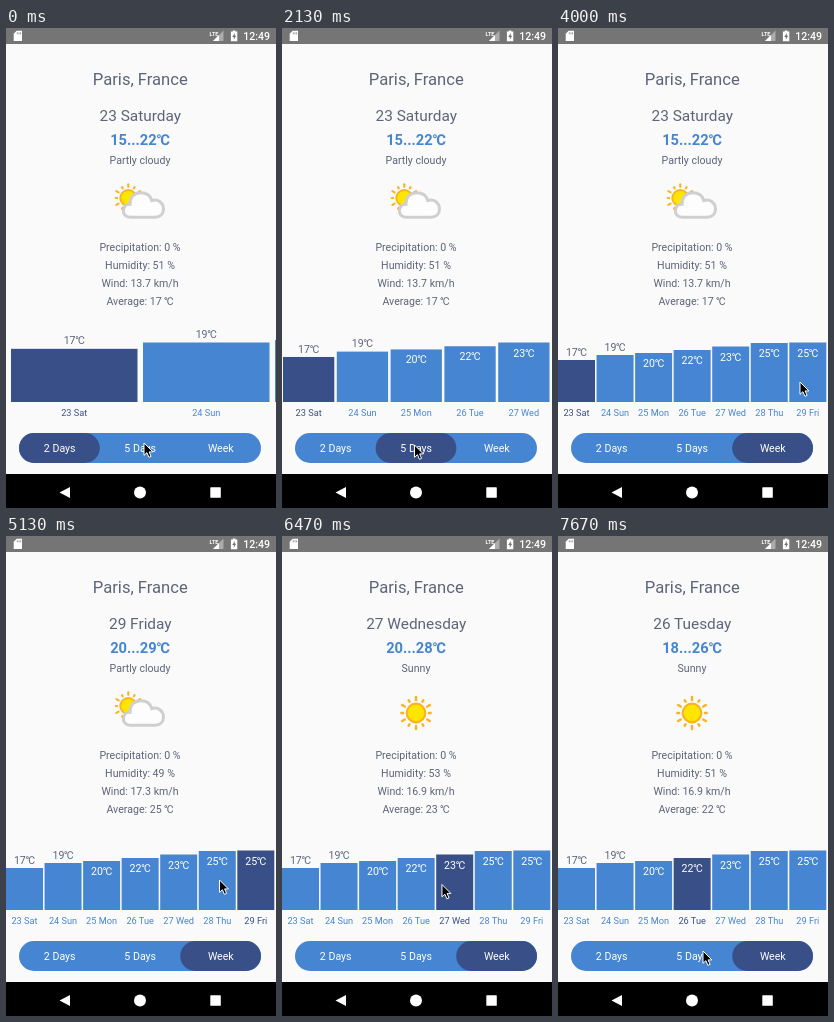
An HTML page that plays this animation: 270x480 px, repeating every 8000 ms.

```html
<!DOCTYPE html>
<html lang="en">
<head>
<meta charset="utf-8">
<title>Weather</title>
<style>
html, body { margin: 0; width: 100%; height: 100%; overflow: hidden; background: #fafafa; }
svg { display: block; width: 100vw; height: 100vh; }
text {
  font: 10.6px Roboto, 'Noto Sans CJK SC', 'Noto Sans CJK JP', sans-serif;
  text-anchor: middle;
  fill: #5d6478;
}
#city { font-size: 16.6px; }
#date { font-size: 15.4px; }
#range { font-size: 14.7px; font-weight: 700; fill: #4685d1; }
.bar { fill: #4685d1; }
.bar.on { fill: #394f88; }
.day { font-size: 9.2px; fill: #4685d1; }
.day.on { fill: #394f88; }
.inside, .tab { fill: #fff; }
#status text { fill: #fff; }
</style>
</head>
<body>
<svg viewBox="0 0 270 480">
  <defs>
    <g id="sun">
      <g id="rays" stroke="#f8b423" stroke-width="2.5" stroke-linecap="round"></g>
      <circle r="9.3" fill="#ffe500" stroke="#f8b423" stroke-width="2.2"/>
    </g>
  </defs>
  <rect width="270" height="480" fill="#fafafa"/>

  <text id="city" x="134.3" y="57">Paris, France</text>
  <text id="date" x="134.3" y="93"></text>
  <text id="range" x="134" y="117"></text>
  <text id="sky" x="134" y="136"></text>
  <use id="sunny" href="#sun" x="134" y="177"/>
  <g id="cloudy">
    <use href="#sun" transform="translate(122.3 170) scale(.86)"/>
    <path d="M125 189.3C119 189.3 116.800 185.500 117.500 181.500C118.200 178 121 176 124 176.300C124 169 128.500 164.800 135 164.800C140.500 164.800 144.500 168 145.800 172.500C152 170.500 157.500 175 157.500 181C157.500 186 154 189.300 149 189.300Z"
      fill="#fdfdfd" stroke="#cfcfd1" stroke-width="3"/>
  </g>
  <g id="facts"></g>

  <g id="chart"></g>

  <rect x="13" y="405" width="242" height="30" rx="15" fill="#4685d1"/>
  <rect id="pill" x="13" y="405" width="80.8" height="30" rx="15" fill="#394f88"/>
  <text class="tab" x="53.7" y="424.300">2 Days</text>
  <text class="tab" x="134.2" y="424.300">5 Days</text>
  <text class="tab" x="214.8" y="424.300">Week</text>

  <g id="status">
    <rect width="270" height="16" fill="#757575"/>
    <path d="M10.700 2.800H16V13H7.700V5.800Z" fill="#fff"/>
    <path d="M11.300 4.300V6.300M13 4.300V6.300M14.600 4.300V6.300" stroke="#757575" stroke-width=".7"/>
    <path d="M217.500 2.500V13H207Z" fill="#fff" opacity=".4"/>
    <path d="M213 7V13H207Z" fill="#fff"/>
    <text x="208" y="7.600" style="font-size:5.500px;font-weight:700">LTE</text>
    <path d="M226.800 2.500H229.400V3.600H231.300V13.200H224.900V3.600H226.800Z" fill="#fff"/>
    <path d="M228.800 5L226.200 9H227.800V11.800L230.200 7.800H228.800Z" fill="#757575"/>
    <text x="250.700" y="12" style="font-weight:500">12:49</text>
  </g>

  <rect y="446" width="270" height="34" fill="#000"/>
  <g fill="#fff">
    <path d="M53.500 464.500L64 459V470Z"/>
    <circle cx="134" cy="464.500" r="6"/>
    <rect x="204.300" y="459.300" width="10.500" height="10.500" rx=".6"/>
  </g>

  <path id="cursor" d="M0 0V12.300L2.900 9.700L4.900 14.300L7.100 13.400L5.100 8.900H8.900Z"
    fill="#000" stroke="#fff" stroke-width="1" stroke-linejoin="round"/>
</svg>
<script>
const LOOP = 8000;
const $ = id => document.getElementById(id);

const days = ['23 Sat', '24 Sun', '25 Mon', '26 Tue', '27 Wed', '28 Thu', '29 Fri'];
const temps = [17, 19, 20, 22, 23, 25, 25];
const heights = [42, 47, 49, 52, 55.5, 59, 59.5];

// start time, day index, date, range, sky, humidity, wind
const picks = [
  [0, 0, '23 Saturday', '15...22', 'Partly cloudy', 51, 13.7],
  [4530, 6, '29 Friday', '20...29', 'Partly cloudy', 49, 17.3],
  [5470, 5, '28 Thursday', '21...29', 'Partly cloudy', 54, 15.5],
  [6270, 4, '27 Wednesday', '20...28', 'Sunny', 53, 16.9],
  [7000, 3, '26 Tuesday', '18...26', 'Sunny', 51, 16.9]
];

// time, tab position, first bar x, bar pitch, bar width, height scale
const layouts = [
  [0, 0, 5, 132, 126.5, 59.5 / 47],
  [1690, 0, 5, 132, 126.5, 59.5 / 47],
  [2110, 1, 1, 53.8, 51.3, 59.5 / 55.5],
  [3160, 1, 1, 53.8, 51.3, 59.5 / 55.5],
  [3650, 2, 0, 38.55, 37, 1]
];

// time, x, y
const path = [
  [0, 138, 415], [60, 138, 415], [200, 138, 426], [1180, 138, 426],
  [1330, 132.5, 417], [2300, 132.5, 417], [3070, 215, 419], [3840, 215, 419],
  [4000, 242, 354], [4700, 242, 354], [5130, 213.5, 344], [5600, 213.5, 344],
  [6000, 170, 348], [6370, 170, 348], [6670, 132, 350], [7200, 132, 350],
  [7670, 145, 415]
];

function make(tag, parent, attrs) {
  const el = document.createElementNS('http://www.w3.org/2000/svg', tag);
  for (const k in attrs) el.setAttribute(k, attrs[k]);
  return parent.appendChild(el);
}

function set(el, attrs) {
  for (const k in attrs) el.setAttribute(k, attrs[k]);
}

// Eased values of a keyed track at time t
function sample(track, t) {
  let i = track.length - 1;
  while (track[i][0] > t) i--;
  const a = track[i], b = track[i + 1] || a;
  const p = b === a ? 0 : (t - a[0]) / (b[0] - a[0]);
  const e = p * p * (3 - 2 * p);
  return a.slice(1).map((v, k) => v + (b[k + 1] - v) * e);
}

for (let i = 0; i < 12; i++) {
  make('path', $('rays'), { d: `M0 -13V${i % 2 ? -14.6 : -16}`, transform: `rotate(${i * 30})` });
}

const facts = [223, 241, 259, 277].map(y => make('text', $('facts'), { x: 134, y }));
const bars = days.map((day, i) => {
  const rect = make('rect', $('chart'), { class: 'bar' });
  const value = make('text', $('chart'), { class: i < 2 ? '' : 'inside' });
  const label = make('text', $('chart'), { class: 'day', y: 388 });
  value.textContent = temps[i] + '℃';
  label.textContent = day;
  return { rect, value, label };
});

let shown = null;

function showDay(pick) {
  if (pick === shown) return;
  shown = pick;
  const [, index, date, range, sky, humidity, wind] = pick;
  $('date').textContent = date;
  $('range').textContent = range + '℃';
  $('sky').textContent = sky;
  $('sunny').style.display = sky === 'Sunny' ? '' : 'none';
  $('cloudy').style.display = sky === 'Sunny' ? 'none' : '';
  const lines = ['Precipitation: 0 %', `Humidity: ${humidity} %`, `Wind: ${wind} km/h`, `Average: ${temps[index]} ℃`];
  facts.forEach((el, i) => { el.textContent = lines[i]; });
  bars.forEach(({ rect, label }, i) => {
    rect.classList.toggle('on', i === index);
    label.classList.toggle('on', i === index);
  });
}

function draw(now) {
  const t = now % LOOP;
  showDay(picks.filter(p => p[0] <= t).pop());

  const [tab, left, pitch, width, scale] = sample(layouts, t);
  set($('pill'), { x: 13 + tab * 80.6 });
  bars.forEach(({ rect, value, label }, i) => {
    const x = left + i * pitch, height = heights[i] * scale, top = 374 - height;
    set(rect, { x, y: top, width, height });
    set(value, { x: x + width / 2, y: top + (i < 2 ? -4.4 : 14) });
    set(label, { x: x + width / 2 });
  });

  const [x, y] = sample(path, t);
  set($('cursor'), { transform: `translate(${x} ${y})` });
}

const start = performance.now();
function tick() {
  draw(performance.now() - start);
  requestAnimationFrame(tick);
}
tick();
</script>
</body>
</html>
```
